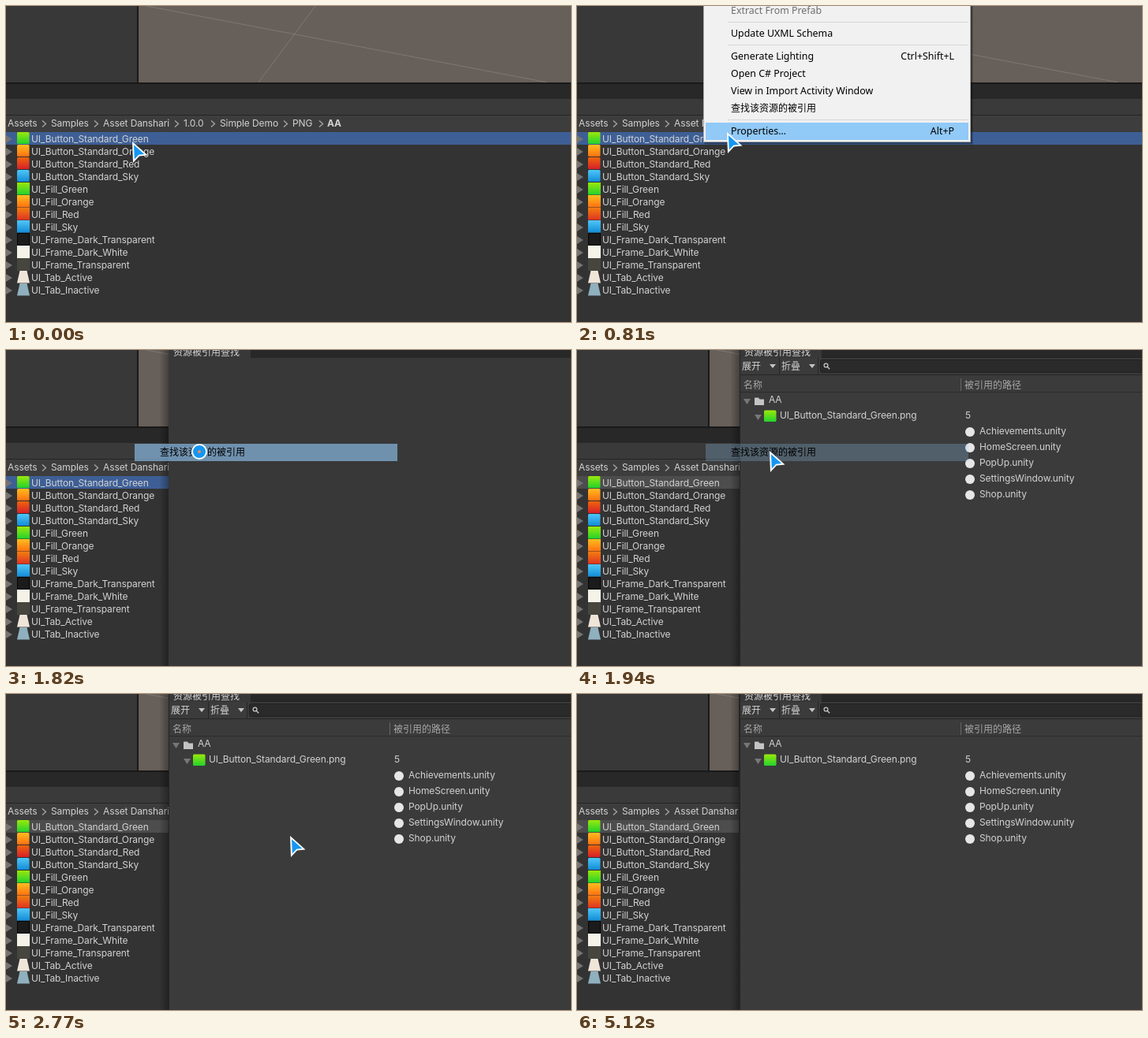
Recreate the animation shown at these times as an HTML page. Size 716 by 401 pixels, loop 5.29 s.

```html
<!DOCTYPE html>
<html lang="zh">
<head>
<meta charset="utf-8">
<title>Find asset references</title>
<style>
html, body { margin: 0; width: 100%; height: 100%; overflow: hidden; background: #333; }
svg { display: block; width: 716px; height: 401px; }
text { font: 12px Inter, "Noto Sans CJK SC", "Noto Sans CJK", sans-serif; letter-spacing: -.1px; fill: #d2d2d2; white-space: pre; }
.cjk { font-family: "Noto Sans CJK SC", "Noto Sans CJK", sans-serif; letter-spacing: 0; }
.head { fill: #a6a6a6; }
.menu { font: 12.4px "Noto Sans", "Open Sans", sans-serif; letter-spacing: 0; fill: #000; }
.menu.cjk { font: 12px "Noto Sans CJK SC", "Noto Sans CJK", sans-serif; }
.off { fill: #6d6d6d; }
.end { text-anchor: end; }
.bold { font-weight: 700; }
</style>
</head>
<body>
<svg id="stage" viewBox="0 0 716 401" xmlns="http://www.w3.org/2000/svg"></svg>
<script>
const LOOP = 5290;

const rect = (x, y, w, h, fill, extra = '') =>
  `<rect x="${x}" y="${y}" width="${w}" height="${h}" fill="${fill}" ${extra}/>`;
const text = (x, y, label, cls = '') => `<text x="${x}" y="${y}" class="${cls}">${label}</text>`;
const path = (d, fill, extra = '') => `<path d="${d}" fill="${fill}" ${extra}/>`;
const group = (id, ...parts) => `<g id="${id}">${parts.join('')}</g>`;
const gradient = (id, top, bottom) =>
  `<linearGradient id="${id}" x2="0" y2="1"><stop stop-color="${top}"/><stop offset="1" stop-color="${bottom}"/></linearGradient>`;

const defs = `<defs>
  ${gradient('green', '#9be80c', '#22d22c')}
  ${gradient('orange', '#ffbd1e', '#ff7010')}
  ${gradient('red', '#f0640e', '#d6202a')}
  ${gradient('ember', '#f27d10', '#de3422')}
  ${gradient('sky', '#50c6f8', '#128cd6')}
  <linearGradient id="shade"><stop stop-opacity="0"/><stop offset="1" stop-opacity=".32"/></linearGradient>
</defs>`;

const icons = {
  button: fill => y => rect(14, y, 15.5, 15, `url(#${fill})`, 'rx="1.5"'),
  fill: fill => y => rect(14, y, 16, 15.5, `url(#${fill})`),
  frame: (fill, edge) => y => rect(14.5, y + .5, 15, 15, fill, `stroke="${edge}"`),
  tab: fill => y => path(`M17.5 ${y}h9l3.5 15.5h-16z`, fill)
};

const assets = [
  ['UI_Button_Standard_Green', icons.button('green')],
  ['UI_Button_Standard_Orange', icons.button('orange')],
  ['UI_Button_Standard_Red', icons.button('red')],
  ['UI_Button_Standard_Sky', icons.button('sky')],
  ['UI_Fill_Green', icons.fill('green')],
  ['UI_Fill_Orange', icons.fill('orange')],
  ['UI_Fill_Red', icons.fill('ember')],
  ['UI_Fill_Sky', icons.fill('sky')],
  ['UI_Frame_Dark_Transparent', icons.frame('#1b1b1b', '#050505')],
  ['UI_Frame_Dark_White', icons.frame('#f5f2e8', '#f5f2e8')],
  ['UI_Frame_Transparent', icons.frame('#47463e', '#47463e')],
  ['UI_Tab_Active', icons.tab('#efe5d9')],
  ['UI_Tab_Inactive', icons.tab('#8fb0bd')]
];

const crumbs = [[2, 'Assets'], [57, 'Samples'], [123, 'Asset Danshari'], [225, '1.0.0'], [271, 'Simple Demo'], [363, 'PNG']];
const chevrons = [46, 112, 214, 260, 352, 397];

const editor = [
  rect(0, 0, 716, 401, '#333'),
  rect(0, 0, 166, 97, '#383838'),
  rect(166, 0, 2, 97, '#191919'),
  rect(168, 0, 548, 97, '#675f5a'),
  path('M178 0L686 97M392 0L320 97', 'none', 'stroke="#827f7b" stroke-width=".8"'),
  rect(0, 97, 716, 2, '#191919'),
  rect(0, 99, 716, 19, '#282828'),
  rect(0, 118, 716, 20, '#3a3a3a'),
  rect(0, 138, 716, 1, '#252525'),
  rect(0, 139, 716, 21, '#3d3d3d'),
  ...crumbs.map(([x, label]) => text(x, 153, label, 'crumb')),
  text(407, 153, 'AA', 'bold'),
  ...chevrons.map(x => path(`M${x} 145.5l4.5 4-4.5 4`, 'none', 'stroke="#a8a8a8" stroke-width="1.3"')),
  rect(0, 160, 716, 16, '#3e5f96', 'id="selection"'),
  ...assets.map(([name, icon], i) => {
    const y = 160 + 16 * i;
    return path(`M0 ${y + 4}l8 5-8 5z`, '#737373') + icon(y) + text(32, y + 13, name);
  })
].join('');

const scenes = ['Achievements', 'HomeScreen', 'PopUp', 'SettingsWindow', 'Shop'];
const down = (x, y, w, h, fill) => path(`M${x} ${y}h${w}l${-w / 2} ${h}z`, fill);

const panel = group('panel',
  rect(194, 0, 12, 401, 'url(#shade)'),
  rect(206, 0, 510, 401, '#383838'),
  rect(310, 0, 406, 10, '#282828'),
  text(212, 7, '资源被引用查找', 'cjk'),
  group('results',
    rect(206, 10, 510, 391, '#3b3b3b'),
    rect(206, 0, 1, 401, '#242424'),
    rect(310, 9, 406, 1, '#222'),
    text(209, 25, '展开', 'cjk'), down(244, 18, 8, 5, '#c4c4c4'),
    text(259, 25, '折叠', 'cjk'), down(294, 18, 8, 5, '#c4c4c4'),
    rect(256, 10, 1, 21, '#272727'), rect(305, 10, 1, 21, '#272727'),
    rect(308.5, 12.5, 412, 16, '#2a2a2a', 'stroke="#212121" rx="2"'),
    '<circle cx="315.5" cy="19.5" r="2.4" fill="none" stroke="#ccc" stroke-width="1.2"/>',
    path('M317.2 21.2l3 3', 'none', 'stroke="#ccc" stroke-width="1.3"'),
    rect(207, 31, 509, 1, '#262626'),
    rect(207, 53, 509, 1, '#2c2c2c'),
    rect(486, 36, 1, 16, '#666'),
    text(211, 49, '名称', 'cjk head'), text(491, 49, '被引用的路径', 'cjk head'),
    down(211, 62, 9, 7, '#777'),
    path('M225 60.5h5l1.5 2h5.5v7.5h-12z', '#c4c4c4'),
    text(243, 67, 'AA'),
    down(225, 82, 9, 7, '#777'),
    rect(237, 76.5, 15.5, 14.5, 'url(#green)', 'rx="1.5"'),
    text(257, 87, 'UI_Button_Standard_Green.png'), text(492, 87, '5'),
    ...scenes.map((name, i) =>
      `<circle cx="498" cy="${104 + 20 * i}" r="6" fill="#e6e6e6"/>` + text(510, 107 + 20 * i, name + '.unity'))
  ),
  rect(205, 0, 1, 401, '#242424', 'id="edge"')
);

const highlight = id => rect(163, 119, 333, 22, '#91c9f7', `id="${id}"`);
const findLabel = text(195, 134, '查找该资源的被引用', 'menu cjk');
const item = (y, label, cls = '') => text(195, y, label, 'menu ' + cls);
const shortcut = (y, label) => text(478, y, label, 'menu end');

const menu = group('menu',
  rect(162, 0, 340, 176, '#000', 'opacity=".16"'),
  rect(161, 0, 340, 174.5, '#000', 'opacity=".28"'),
  rect(160, 0, 339, 173, '#a9a9a9'),
  rect(161, 0, 337, 172, '#f1f1f1'),
  highlight('hover'),
  ...[20, 49, 144].map(y => rect(191, y, 305, 1, '#d6d6d6')),
  item(10, 'Extract From Prefab', 'off'),
  item(39, 'Update UXML Schema'),
  item(68, 'Generate Lighting'), shortcut(68, 'Ctrl+Shift+L'),
  item(90, 'Open C# Project'),
  item(112, 'View in Import Activity Window'),
  findLabel,
  item(163, 'Properties...'), shortcut(163, 'Alt+P')
);

const fading = group('fading', highlight('ghost'), findLabel);

const pointer = group('pointer',
  path('M0 0L19.5 17.5 9 18.5 1 27z', '#fff'),
  path('M2 4.2L15.2 16 8.2 16.8 2.8 22.6z', '#1496f2'));

const press = group('press',
  '<circle cx="245" cy="129" r="9" fill="#1496f2" stroke="#fff" stroke-width="2"/>',
  '<circle cx="245" cy="129" r="2" fill="#f08a5a"/>');

document.getElementById('stage').innerHTML = defs + editor + panel + menu + fading + press + pointer;

// Each table row is [start time, value...]; the latest started row holds.
const pointerSteps = [
  [0, 160, 172], [810, 190, 160], [960, 225, 136], [1080, 240, 128], [1230, 244, 128],
  [1820, -99, -99], [1940, 244, 128], [2770, 360, 180], [2920, 470, 238],
  [3040, 590, 306], [3160, 690, 370], [3280, -99, -99]
];
const hoverSteps = [[0, -99], [810, 148], [960, 119]];
const fadeSteps = [[0, 0], [1820, .62], [1940, .25], [2090, 0]];

const at = (steps, t) => steps.findLast(([start]) => t >= start).slice(1);
const byId = id => document.getElementById(id);
const show = (id, on) => byId(id).style.display = on ? '' : 'none';

function draw(t) {
  const [x, y] = at(pointerSteps, t);
  byId('pointer').setAttribute('transform', `translate(${x} ${y})`);
  byId('hover').setAttribute('y', at(hoverSteps, t)[0]);
  byId('ghost').style.opacity = at(fadeSteps, t)[0];
  byId('selection').setAttribute('fill', t < 1940 ? '#3e5f96' : '#4d4d4d');
  show('menu', t >= 400 && t < 1820);
  show('fading', t >= 1820 && t < 2090);
  show('press', t >= 1820 && t < 1940);
  show('panel', t >= 1820);
  show('results', t >= 1940);
  show('edge', t >= 5120);
}

const begin = performance.now();
function tick() {
  draw((performance.now() - begin) % LOOP);
  requestAnimationFrame(tick);
}
tick();
</script>
</body>
</html>
```
